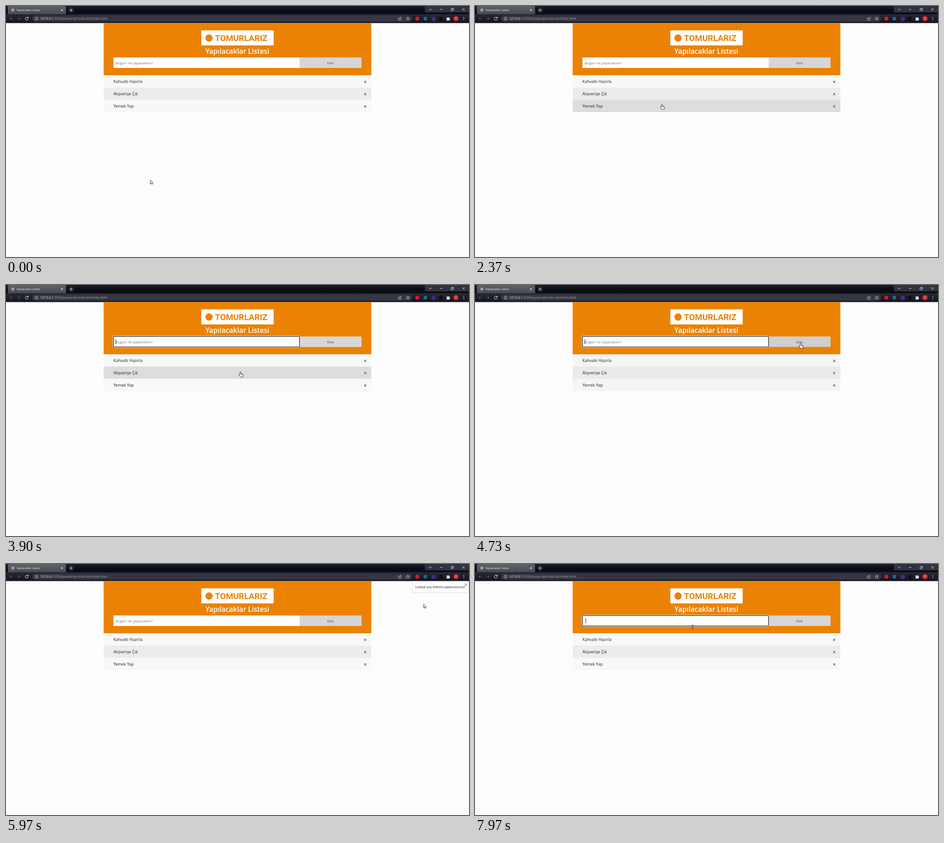
Animation, 1017 px wide and 551 px high, one loop 8 s. Source, as an HTML page:

```html
<!DOCTYPE html>
<html lang="tr">
<head>
<meta charset="utf-8">
<title>Yapılacaklar Listesi</title>
<style>
  html, body { margin: 0; width: 100%; height: 100%; overflow: hidden; background: #fdfdfd; }
  svg { display: block; width: 100%; height: 100%; font: 8.9px "Open Sans", "Noto Sans", sans-serif; cursor: default; }
  .line { fill: none; stroke: #dcdde2; }
  .small { font-size: 7.95px; }
  .x { font-size: 9.5px; font-weight: 700; fill: #666; text-anchor: middle; }
</style>
</head>
<body>
<svg viewBox="0 0 1017 551">
  <defs>
    <linearGradient id="tabFill" x2="0" y2="1"><stop stop-color="#60636a"/><stop offset="1" stop-color="#484b51"/></linearGradient>
    <linearGradient id="strip" x2="0" y2="1"><stop stop-color="#1b1e2c"/><stop offset=".5" stop-color="#0b0d17"/><stop offset="1" stop-color="#0a0b12"/></linearGradient>
    <linearGradient id="bar" x2="0" y2="1"><stop stop-color="#272934"/><stop offset="1" stop-color="#14151f"/></linearGradient>
  </defs>

  <!-- browser frame -->
  <rect width="1017" height="18" fill="url(#strip)"/>
  <path d="M4 18V4Q4 0 8 0H128Q132 0 132 4V18Z" fill="url(#tabFill)"/>
  <rect y="18" width="1017" height="19.5" fill="url(#bar)"/>
  <circle cx="15" cy="9" r="3.4" fill="#8c9097"/>
  <path class="line" d="M12.5 7.5L15 9 14 12M16 6L17.5 9" stroke-width=".8"/>
  <text x="23" y="11.2" font-size="5.96" fill="#fff">Yapılacaklar Listesi</text>
  <path class="line" d="M121 7l4 4m0-4l-4 4" style="stroke:#fff"/>
  <circle cx="143" cy="9" r="6.5" fill="#252833"/>
  <path class="line" d="M140 9h6m-3-3v6"/>
  <path d="M920 0H1017V14H923Q920 14 920 11Z" fill="#303340"/>
  <path class="line" d="M929 6l3 3 3-3M953.500 7.500h5M1002.500 5l5 5m0-5l-5 5"/>
  <path class="line" d="M977.500 6.500h4v4h-4zM979 6V5h4v4h-1" stroke-width=".8"/>

  <rect x="57" y="21" width="835" height="13.500" rx="6.750" fill="#353641"/>
  <path class="line" d="M15 27.700H8.500m3-3l-3 3 3 3M25 27.700h6.500m-3-3l3 3-3 3" style="stroke:#5d606a"/>
  <path class="line" d="M48.300 25.700A3.300 3.300 0 1 0 49 28.500M49.200 24v2.600h-2.600" style="stroke:#fff"/>
  <circle class="line" cx="67" cy="27.700" r="3.200" stroke-width=".8"/>
  <path class="line" d="M67 27.300v2.300M67 25.700v.8" stroke-width=".8"/>
  <text x="75" y="30.300" font-size="7" fill="#a3a5ad"><tspan fill="#fff">127.0.0.1</tspan>:5500/javascript-todo-list/index.html</text>
  <path class="line" d="M864 26h-2v5h6v-2M864 29q.3-3 4-3m-1.600-2l2 2-2 2" stroke-width=".8"/>
  <path class="line" d="M882.500 24l1.100 2.500 2.700.2-2.100 1.700.7 2.700-2.400-1.500-2.400 1.500.7-2.700-2.100-1.700 2.700-.2z" stroke-width=".8"/>
  <circle cx="903.500" cy="27.700" r="4.500" fill="#e0123f"/>
  <rect x="917.500" y="24" width="7" height="7.500" fill="#156f9b"/>
  <circle cx="939.500" cy="28.500" r="5" fill="#4a2590"/>
  <rect x="951.500" y="24" width="7" height="8" fill="#0b0c14"/>
  <path d="M967.500 25.500h2.200a1.400 1.400 0 0 1 2.600 0h2.200v2.200a1.400 1.400 0 0 1 0 2.600v1.700h-7v-2a1.300 1.300 0 0 0 0-2.400z" fill="#dcdde2"/>
  <circle cx="988.500" cy="27.700" r="6" fill="#c5221f"/>
  <text x="988.500" y="30.300" font-size="7" fill="#fff" text-anchor="middle">Ö</text>
  <path d="M1005.500 25v.1m0 2.600v.1m0 2.600v.1" stroke="#eee" stroke-width="1.600" stroke-linecap="round"/>

  <!-- page -->
  <rect x="214.500" y="37.500" width="588" height="114.500" fill="#eb8203"/>
  <rect x="429" y="53.500" width="159" height="33" fill="#fff"/>
  <circle cx="446" cy="70.300" r="8" fill="#eb8203"/>
  <text x="459" y="76.800" font-size="18.500" font-weight="700" fill="#eb8203" font-family="Roboto, sans-serif">TOMURLARIZ</text>
  <text x="508.200" y="105.300" font-size="15.400" font-weight="600" fill="#fff" text-anchor="middle">Yapılacaklar Listesi</text>
  <rect x="236" y="113" width="409" height="23" fill="#fefefe"/>
  <rect id="button" x="645" y="113" width="136" height="23"/>
  <text class="small" x="713" y="127.700" fill="#555" text-anchor="middle">Ekle</text>
  <g id="ring" fill="none">
    <rect x="235.500" y="112.500" width="409.500" height="24" rx="1.500" stroke="#fff" stroke-width="2.600"/>
    <rect x="235.800" y="112.800" width="409" height="23.400" rx="1" stroke="#101010" stroke-width="1.300"/>
  </g>
  <text id="hint" class="small" x="241" y="127.700" fill="#757575">Bugün ne yapacaksın?</text>
  <rect id="caret" y="119" width="1" height="11" fill="#222"/>
  <g id="list"></g>

  <g id="toast">
    <rect x="891.500" y="38" width="124" height="26" rx="2" fill="#000" opacity=".05"/>
    <rect x="893" y="38" width="121.500" height="24" rx="1.500" fill="#fff" stroke="#e3e3e3" stroke-width=".7"/>
    <text x="899" y="53" font-size="7" fill="#222">Listeye boş ekleme yapamazsınız!</text>
    <path class="line" d="M1007.500 43l5 5m0-5l-5 5" style="stroke:#555"/>
  </g>

  <g id="cursor" fill="#fff" stroke="#111" stroke-width=".8" stroke-linejoin="round">
    <path id="arrow" d="M0 0V8.600L2 6.800 3.300 9.800 4.700 9.200 3.400 6.300H6Z"/>
    <path id="hand" d="M-1 1Q0-.6 1 1V4.500L5 5.600Q6.200 6 5.900 8L5 12H0L-3.400 8Q-3.800 6.300-2.400 6.500L-1 7.700ZM2.300 5v2M4 5.500v2"/>
    <path id="beam" fill="none" d="M-2-4H-.5L0-3.500 .5-4H2M0-3.500V3.500M-2 4H-.5L0 3.500 .5 4H2"/>
  </g>
</svg>
<script>
const LOOP = 8000, FADE = 300, STEPS = 20;
const CLICK_INPUT = 3400, CLICK_ADD = 4800, CLICK_CLOSE = 6950, CLICK_AGAIN = 7620, TYPE_SPACE = 7850;
const $ = id => document.getElementById(id);
const clamp = v => Math.max(0, Math.min(1, v));

// pointer stops: time, x, y
const stops = [
  [0, 317, 382], [620, 560, 424], [1260, 854, 379], [1630, 800, 208], [2450, 400, 215],
  [2720, 372, 356], [3130, 335, 172], [3380, 400, 126], [3620, 490, 188], [3900, 515, 190],
  [4270, 570, 415], [4720, 715, 127], [4950, 718, 127], [5500, 735, 135.500], [6250, 1000, 66],
  [6600, 1010, 60], [6880, 1010, 46], [7000, 1010, 46], [7580, 470, 126], [7970, 478, 138], [LOOP, 478, 138]
];

function pointer(t) {
  t = Math.max(0, t);
  let i = 1;
  while (i < stops.length - 1 && t > stops[i][0]) i++;
  const [t0, x0, y0] = stops[i - 1], [t1, x1, y1] = stops[i];
  const p = clamp((t - t0) / (t1 - t0)), e = p * p * (3 - 2 * p);
  return [x0 + (x1 - x0) * e, y0 + (y1 - y0) * e];
}

const within = ([px, py], [x, y, w, h]) => px >= x && px < x + w && py >= y && py < y + h;

$("list").innerHTML = ["Kahvaltı Hazırla", "Alışverişe Çık", "Yemek Yap"].map((label, i) => {
  const y = 152 + 27 * i;
  return `<rect id="row${i}" x="214.5" y="${y}" width="588" height="27"/>
    <text x="236" y="${y + 16.9}" fill="#222">${label}</text>
    <text class="x" x="789" y="${y + 17.4}">x</text>`;
}).join("");

const inputBox = [236, 113, 409, 27], closeBox = [1004, 39, 12, 13];
const hovers = [0, 1, 2].map(i => ({ id: "row" + i, box: [214.500, 152 + 27 * i, 588, 27], from: i === 1 ? 236 : 248, to: 221 }));
hovers.push({ id: "button", box: [645, 113, 136, 24], from: 214, to: 185 });

// share of the recent past spent inside a box, so colours fade in and out
function hoverAmount(t, box) {
  let n = 0;
  for (let k = 0; k < STEPS; k++) n += within(pointer(t - k * FADE / STEPS), box);
  return n / STEPS;
}

const show = (id, on) => $(id).style.display = on ? "" : "none";

function draw(t) {
  for (const { id, box, from, to } of hovers) {
    const g = Math.round(from + (to - from) * hoverAmount(t, box));
    $(id).setAttribute("fill", `rgb(${g},${g},${g})`);
  }

  const again = t >= CLICK_AGAIN, typed = t >= TYPE_SPACE;
  const focused = again || (t >= CLICK_INPUT && t < CLICK_ADD);
  const since = t - (typed ? TYPE_SPACE : again ? CLICK_AGAIN : CLICK_INPUT);
  show("ring", focused);
  show("caret", focused && since % 1060 < 530);
  $("caret").setAttribute("x", typed ? 242.600 : 240.700);
  show("hint", !typed);

  const open = clamp((t - CLICK_ADD) / 150) * clamp((CLICK_CLOSE + 150 - t) / 150);
  $("toast").style.opacity = open;

  const at = pointer(t);
  const beam = within(at, inputBox);
  const hand = hovers.some(h => within(at, h.box)) || (open > 0 && within(at, closeBox));
  show("beam", beam);
  show("hand", hand);
  show("arrow", !beam && !hand);
  $("cursor").setAttribute("transform", `translate(${at})`);
}

const start = performance.now();
function tick() {
  draw((performance.now() - start) % LOOP);
  requestAnimationFrame(tick);
}
tick();
</script>
</body>
</html>
```
